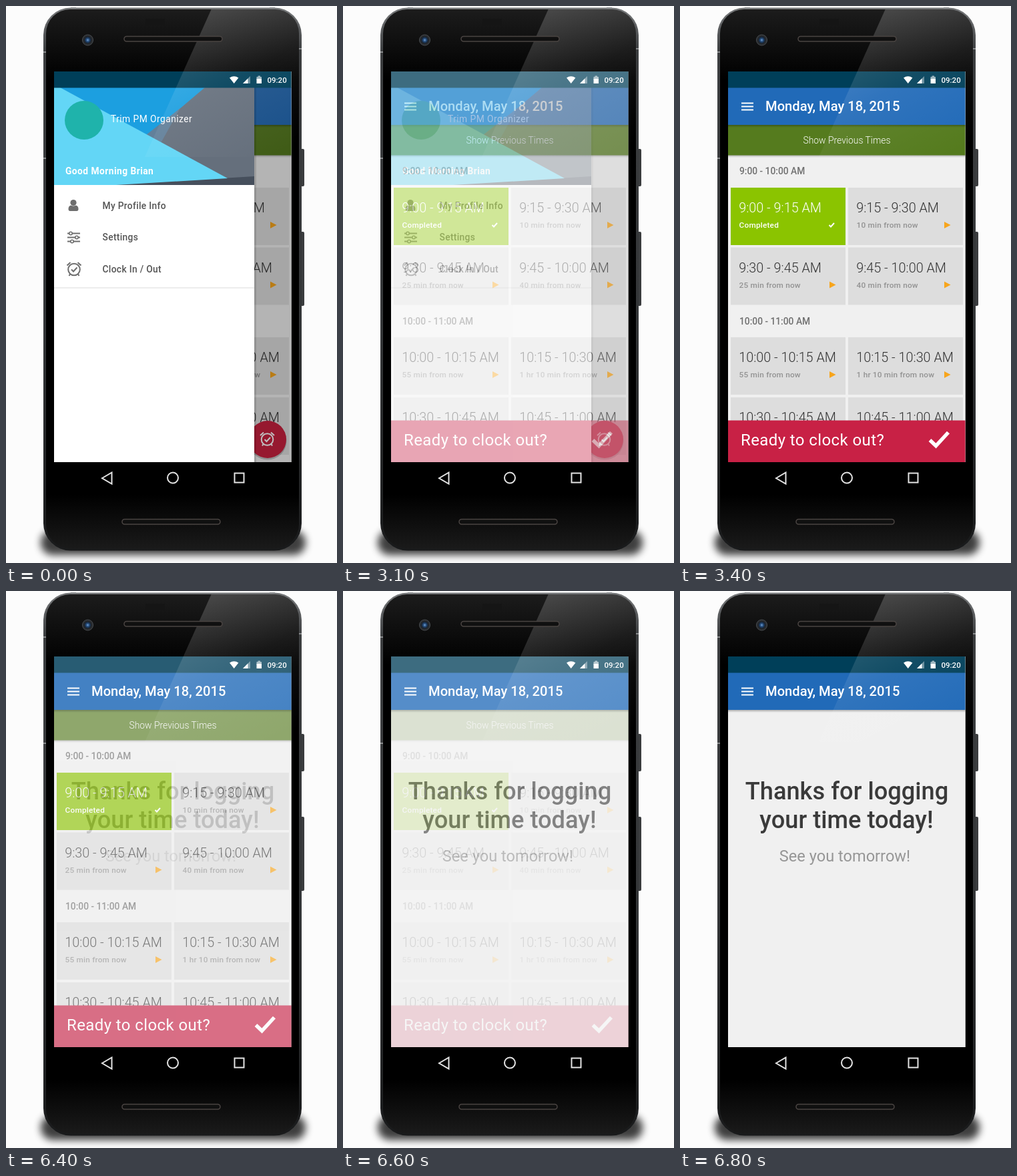
An HTML page for the animation above (9.8 s loop, 496 px wide and 834 px high).

```html
<!DOCTYPE html>
<html lang="en">
<head>
<meta charset="utf-8">
<title>Time logging app</title>
<style>
html, body { margin: 0; height: 100%; overflow: hidden; background: #fcfcfc; }
svg { display: block; width: 100%; height: 100%; }
text { font-family: Roboto, sans-serif; white-space: pre; }
.label { font-size: 13.8px; font-weight: 500; }
.menu { letter-spacing: .32px; fill: #555; }
.slot { font-size: 19.8px; font-weight: 300; fill: #333; }
.note { font-size: 11.8px; font-weight: 500; letter-spacing: .2px; fill: #929292; }
.done { fill: #fff; }
.line { fill: none; stroke-width: 2; }
</style>
</head>
<body>
<svg viewBox="0 0 496 834">
  <defs>
    <linearGradient id="rim" x2="0" y2="1">
      <stop stop-color="#77797b"/><stop offset=".08" stop-color="#3c3e40"/>
      <stop offset=".6" stop-color="#333537"/><stop offset="1" stop-color="#191a1b"/>
    </linearGradient>
    <linearGradient id="face" x2="0" y2="1">
      <stop stop-color="#1c1c1c"/><stop offset=".13"/>
      <stop offset=".9"/><stop offset="1" stop-color="#1a1a1a"/>
    </linearGradient>
    <linearGradient id="gloss" gradientUnits="userSpaceOnUse" x1="290" y1="20" x2="400" y2="225">
      <stop stop-color="#fff" stop-opacity=".19"/>
      <stop offset=".45" stop-color="#fff" stop-opacity=".07"/>
      <stop offset="1" stop-color="#fff" stop-opacity="0"/>
    </linearGradient>
    <linearGradient id="shade" x2="0" y2="1">
      <stop stop-opacity=".28"/><stop offset="1" stop-opacity="0"/>
    </linearGradient>
    <radialGradient id="lens">
      <stop stop-color="#7fa9d8"/><stop offset=".4" stop-color="#2c5688"/><stop offset="1" stop-color="#101c2c"/>
    </radialGradient>
    <filter id="blur" x="-20%" y="-100%" width="140%" height="300%"><feGaussianBlur stdDeviation="6"/></filter>
    <clipPath id="screen"><rect x="72" y="98" width="355.5" height="585"/></clipPath>
    <clipPath id="glass"><rect x="60" y="5" width="379" height="807" rx="36"/></clipPath>

    <g id="alarm" class="line">
      <circle r="8.8"/>
      <path d="M-4 0l3 3 5.500-6M-10.500-6l5-4.500M10.500-6l-5-4.500M-6 7l-1.500 2.500M6 7l1.500 2.500"/>
    </g>

    <g id="status">
      <path fill="#003f59" d="M72 98h356v24.500H72z"/>
      <g fill="#fff">
        <path d="M335 107.500q6.700-4.500 13.400 0L341.700 116z"/>
        <path opacity=".4" d="M355 116h11v-11z"/>
        <path d="M355 116h7.500v-7.500z"/>
        <path opacity=".6" d="M375.500 106h2v-1.500h3.500v1.500h2v4h-7.500z"/>
        <path d="M375.500 109h7.500v7h-7.500z"/>
        <text x="391.500" y="115" font-size="11.500" font-weight="500">09:20</text>
      </g>
    </g>

    <g id="header">
      <rect x="72" y="178" width="356" height="4" fill="url(#shade)"/>
      <path fill="#216ab8" d="M72 122h356v56H72z"/>
      <path class="line" stroke="#fff" d="M92 145.500h18m-18 5h18m-18 5h18"/>
      <text x="128" y="157.300" font-size="20.150" font-weight="500" fill="#fff">Monday, May 18, 2015</text>
    </g>

    <g id="list"></g>
  </defs>

  <rect x="52" y="785" width="397" height="37" rx="18" opacity=".75" filter="url(#blur)"/>
  <g fill="#3a3c3e">
    <rect x="441" y="214" width="6" height="56" rx="2"/>
    <rect x="441" y="338" width="6" height="111" rx="2"/>
  </g>
  <rect x="56" y="2.500" width="387" height="813" rx="41" fill="url(#rim)"/>
  <path stroke="#8a8c8e" stroke-width="2" d="M56 69h4m-4 159h4m379-164h4M97 3h8m290 0h8"/>
  <rect x="60" y="5" width="379" height="807" rx="36" fill="url(#face)"/>

  <g clip-path="url(#screen)">
    <path fill="#fff" d="M72 98h356v585H72z"/>

    <g id="drawer">
      <use href="#list"/>
      <circle cx="392" cy="651" r="28.500" opacity=".2"/>
      <circle cx="392" cy="649" r="28" fill="#c8213f"/>
      <use href="#alarm" x="391.500" y="649" stroke="#fff"/>
      <path opacity=".25" d="M72 122h356v561H72z"/>
      <path opacity=".12" d="M372 122h3v561h-3z"/>
      <path fill="#fff" d="M72 122h300v561H72z"/>
      <path fill="#656f7c" d="M72 122h300v146H72z"/>
      <path fill="#1c9fe0" d="M72 122h226l-86 73z"/>
      <path fill="#62809a" d="M261 153l-51 40 22 12z"/>
      <path fill="#464f5c" d="M160 268l212-13v13z"/>
      <path fill="#63d6f6" d="M72 122h9l251 136-167 10H72z"/>
      <circle cx="117" cy="171" r="29" fill="#1fb3ab"/>
      <text x="157" y="174.300" font-size="13.800" letter-spacing=".45" fill="#fff">Trim PM Organizer</text>
      <text x="89" y="252" class="label" style="font-weight:700" letter-spacing=".45" fill="#fff">Good Morning Brian</text>
      <g fill="#6e6e6e">
        <circle cx="101" cy="294.500" r="4.600"/>
        <path d="M93.500 304q0-5 4-5.500 3.500 2 7 0 4 .5 4 5.500 0 3-2.500 3h-10q-2.500 0-2.500-3z"/>
      </g>
      <g class="line" stroke="#6e6e6e">
        <path d="M92 340.500h19m-19 6h19m-19 6h19"/>
        <g fill="#fff" stroke-width="1.600">
          <circle cx="97" cy="340.500" r="2.200"/><circle cx="106" cy="346.500" r="2.200"/><circle cx="99" cy="352.500" r="2.200"/>
        </g>
        <use href="#alarm" x="102" y="394.500"/>
      </g>
      <g class="label menu">
        <text x="144.500" y="303.500">My Profile Info</text>
        <text x="144.500" y="351.300">Settings</text>
        <text x="144.500" y="399">Clock In / Out</text>
      </g>
      <path fill="#dcdcdc" d="M72 421.500h300v1H72z"/>
      <use href="#status"/>
    </g>

    <g id="times">
      <use href="#list"/>
      <path fill="#c82145" d="M72 620.500h356V683H72z"/>
      <text x="91" y="658.300" font-size="24" letter-spacing=".4" fill="#fff">Ready to clock out?</text>
      <path fill="none" stroke="#fff" stroke-width="5.500" d="M374.500 650l9 8.500L402 638.500"/>
      <use href="#status"/>
    </g>

    <g id="thanks">
      <path fill="#f0f0f0" d="M72 98h356v585H72z"/>
      <use href="#header"/>
      <g text-anchor="middle" font-size="36.200" font-weight="500" fill="#3a3a3a">
        <text x="250" y="312">Thanks for logging</text>
        <text x="249.500" y="355">your time today!</text>
        <text x="247" y="404.500" font-size="23.600" font-weight="400" fill="#969696">See you tomorrow!</text>
      </g>
      <use href="#status"/>
    </g>
  </g>

  <path clip-path="url(#glass)" fill="url(#gloss)" d="M309 2L208 226h232V2z"/>
  <rect x="209" y="19" width="29" height="10" rx="2" fill="#151515"/>
  <g fill="#101010" stroke="#4a4442" stroke-width="1.500">
    <rect x="177" y="45.500" width="147" height="7.500" rx="3.700"/>
    <rect x="174" y="768.500" width="147" height="7.500" rx="3.700"/>
  </g>
  <circle cx="122.500" cy="51" r="8" fill="#26292d" stroke="#4b4e52"/>
  <circle cx="122.500" cy="51" r="5" fill="url(#lens)"/>
  <g class="line" stroke="#e4e4e4">
    <path d="M144 707l14.500-8.500v17z"/>
    <circle cx="250" cy="706.500" r="8"/>
    <path d="M342.500 699.500h14v14h-14z"/>
  </g>
</svg>
<script>
const $ = id => document.getElementById(id);
const HOLD = 3000, STEP = 100, STEPS = 5, LOOP = 9800;

function tile(x, y, markX, slot, note) {
  const done = note === 'Completed', cls = done ? ' done' : '';
  const mark = done
    ? `<path class="line" stroke="#fff" d="M${markX - .5} ${y + 56}l2.500 2.500 5-5.500"/>`
    : `<path fill="#f7a51c" d="M${markX} ${y + 51}l9.500 5-9.500 5z"/>`;
  return `<rect x="${x}" y="${y}" width="172" height="86" fill="${done ? '#8bc400' : '#dddddd'}"/>
    <text class="slot${cls}" x="${x + 12.2}" y="${y + 37.3}">${slot} AM</text>
    <text class="note${cls}" x="${x + 12.6}" y="${y + 60.2}">${note}</text>${mark}`;
}

const rows = [
  [272, '9:00 - 9:15', 'Completed', '9:15 - 9:30', '10 min from now'],
  [361.5, '9:30 - 9:45', '25 min from now', '9:45 - 10:00', '40 min from now'],
  [496, '10:00 - 10:15', '55 min from now', '10:15 - 10:30', '1 hr 10 min from now'],
  [586, '10:30 - 10:45', '1 hr 25 min from now', '10:45 - 11:00', '1 hr 40 min from now']
];

$('list').innerHTML = `
  <path fill="#f0f0f0" d="M72 98h356v585H72z"/>
  <rect x="72" y="223" width="356" height="4" fill="url(#shade)"/>
  <path fill="#557b1e" d="M72 178h356v45.500H72z"/>
  <use href="#header"/>
  <text x="250" y="206.300" text-anchor="middle" font-size="13.900" font-weight="300" fill="#fff">Show Previous Times</text>
  <g class="label" fill="#707070">
    <text x="89" y="252">9:00 - 10:00 AM</text>
    <text x="89" y="476.500">10:00 - 11:00 AM</text>
  </g>` + rows.map(([y, a, noteA, b, noteB]) =>
    tile(76, y, 224, a, noteA) + tile(252, y, 396, b, noteB)).join('');

// Each cross-fade runs in five even steps over white.
const fade = (t, start) => Math.max(0, Math.min(STEPS, Math.floor((t - start) / STEP) + 1)) / STEPS;

function draw(now) {
  const t = now % LOOP;
  const first = fade(t, HOLD), second = fade(t, 2 * HOLD + 4 * STEP);
  $('drawer').style.opacity = 1 - first;
  $('times').style.opacity = first * (1 - second);
  $('thanks').style.opacity = second;
  requestAnimationFrame(draw);
}
draw(performance.now());
</script>
</body>
</html>
```
